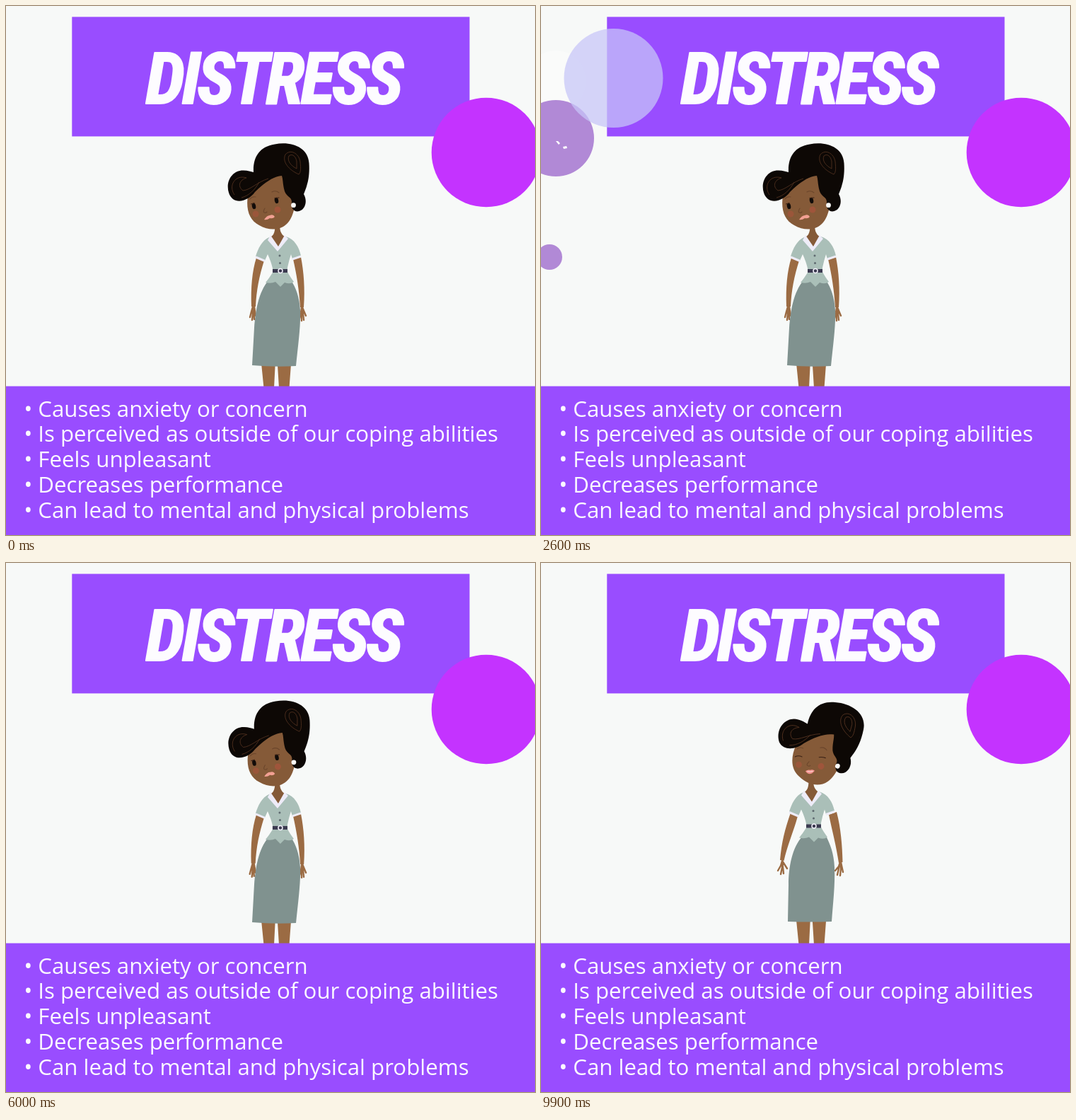
Animation of 748 by 748 pixels, one loop 10 s. Source, as an HTML page:

```html
<!DOCTYPE html>
<html lang="en">
<head>
<meta charset="utf-8">
<title>Distress</title>
<style>
html, body { margin: 0; width: 100%; height: 100%; overflow: hidden; background: #f7f9f8; }
svg { display: block; width: 100%; height: 100%; }
#title {
  font: italic 900 100px "Roboto Condensed", Roboto, sans-serif;
  font-stretch: 75%; letter-spacing: -.045em;
  fill: #fdfcff; stroke: #fdfcff; stroke-width: 2; stroke-linejoin: round;
}
#list { font: 31.2px "Open Sans", sans-serif; fill: #fbf9ff; }
.skin { fill: #9b6b43; }
.face { fill: #855a38; }
.hand { fill: none; stroke: #9b6b43; stroke-width: 2.4; stroke-linecap: round; stroke-linejoin: round; }
.line { fill: none; stroke: #3a2115; stroke-width: 1.1; stroke-linecap: round; }
.strand { fill: none; stroke: #50301f; stroke-width: .9; }
</style>
</head>
<body>
<svg viewBox="0 0 748 748">
  <rect width="748" height="748" fill="#f7f9f8"/>
  <rect x="93.300" y="15.400" width="562.200" height="169" fill="#994dff"/>
  <text id="title" x="377.500" text-anchor="middle">DISTRESS</text>
  <circle cx="679" cy="207" r="77.300" fill="#c433ff"/>

  <path class="skin" d="M360.500 500L364.500 540H379L381 500ZM383.500 500L386 540H400.500L403.500 500Z"/>
  <g id="arms">
    <path id="armL" class="skin"/><path id="armR" class="skin"/>
    <path id="handL" class="hand"/><path id="handR" class="hand"/>
  </g>
  <path id="skirt" fill="#80928f"/>
  <g id="torso">
    <path class="face" d="M380 306L388 306Q385 320 394 326L385 343L373 327Q382 324 380 306Z"/>
    <path fill="#aabfb8" d="M372 327C362 331 356 344 353 354L366 360L370 351Q375 362 377 371V377Q372 385 367 391Q375 393 381 390L388 397L394 391Q402 394 407 390Q401 382 398 376V370Q400 360 403 351L405 358L417 353C414 340 408 330 396 326L385 344Z"/>
    <path fill="#eeecf8" d="M374 324L370 331L384 347L399 329L394 324L385 340Z"/>
    <path fill="none" stroke="#eeecf8" stroke-width="3" d="M353 355L366 360.500M405 358L417 354"/>
    <path fill="#3b3a50" d="M377 372H398V377H377Z"/>
    <circle cx="388" cy="374.500" r="3" fill="#3b3a50" stroke="#f4f2fb" stroke-width="1.500"/>
    <circle cx="387" cy="353" r="1.500" fill="#5f6a70"/>
    <circle cx="387.500" cy="363.500" r="1.500" fill="#5f6a70"/>
  </g>
  <g id="head">
    <path class="face" d="M342 268C339 288 344 303 358 310C372 318 389 318 399 306C404 300 406 293 408 285C411 276 408 268 400 266L392 238C375 242 352 254 342 268Z"/>
    <circle cx="353" cy="294" r="4.500" fill="#b4523e" opacity=".45"/>
    <circle cx="384" cy="288" r="4.500" fill="#b4523e" opacity=".55"/>
    <path class="line" stroke-opacity=".35" d="M345 273Q348 269 353 270M376 263Q381 260 386 264M366 286Q363 291 365 292Q368 293 369 291"/>
    <g id="sad">
      <g fill="#120c09">
        <ellipse cx="350.500" cy="283" rx="2.700" ry="4.200" transform="rotate(-12 350.500 283)"/>
        <ellipse cx="382.500" cy="275" rx="2.700" ry="4.200" transform="rotate(-12 382.500 275)"/>
      </g>
      <path class="line" d="M346.500 280L351 278.500M380 271.500L386 271"/>
      <path fill="#f2a093" d="M365 302Q369 296 373 296Q378 294 380 298Q378 301 373 300Q369 303 365 302Z"/>
    </g>
    <g id="calm">
      <path class="line" d="M345 284.500Q349 281 354.500 282M378 276.500Q382 274.500 387 275"/>
      <g transform="translate(371 299.500) rotate(-15)">
        <path fill="#f2938f" d="M-6.500 -1Q-3 -3.500 0 -2.500Q3.500 -3.500 6.500 -1.500Q3 3 -1 3Q-4.500 2.500 -6.500 -1Z"/>
        <path fill="none" stroke="#fff1ee" stroke-width=".8" d="M-4 -.5Q0 .5 4 -.8"/>
      </g>
    </g>
    <path fill="#0d0805" d="M390 240C378 241 365 250 352 263C343 276 321 283 315 264C310 248 320 232 336 232.500C342 232.500 346 234 350 235C349 214 358 199 380 195.500C404 191 427 200 428.500 222C430 244 425 256 421 266C427 276 423 290 412 290.500C405 290 403 284 404 277C404 270 397 270 394 262C391 252 392 246 390 240Z"/>
    <path class="strand" d="M323 267C314 254 324 238 340 243M333 271C344 268 352 260 358 249M340 243C330 246 327 255 335 261C346 260 355 249 371 244"/>
    <path class="strand" d="M414 238C400 232 390 220 395 210C402 202 414 208 416 220C417 230 417 235 414 238M411 230C403 226 397 219 400 212C405 208 410 213 411 220Z"/>
    <circle cx="406.500" cy="281.700" r="3.400" fill="#fbfaf7"/>
  </g>

  <rect y="537.600" width="748" height="211" fill="#994dff"/>
  <g id="list"></g>
  <g id="bubbles"></g>
  <g id="confetti"></g>
</svg>
<script>
const NS = "http://www.w3.org/2000/svg";
const LOOP = 10000, STEP = 100;
const $ = id => document.getElementById(id);
const clamp = v => Math.max(0, Math.min(1, v));
const ease = v => { v = clamp(v); return v * v * (3 - 2 * v); };
const easeOut = v => 1 - (1 - clamp(v)) ** 3;

function add(parent, tag, attrs) {
  const el = document.createElementNS(NS, tag);
  for (const key in attrs) el.setAttribute(key, attrs[key]);
  return $(parent).appendChild(el);
}

// Blend two paths that share the same commands.
function mix(a, b, k) {
  const to = b.match(/-?[\d.]+/g);
  let i = 0;
  return a.replace(/-?[\d.]+/g, n => (+n + (to[i++] - n) * k).toFixed(2));
}

["Causes anxiety or concern",
 "Is perceived as outside of our coping abilities",
 "Feels unpleasant",
 "Decreases performance",
 "Can lead to mental and physical problems"
].forEach((line, i) => {
  add("list", "text", { x: 25.5, y: 580.5 + 35.8 * i }).textContent = "• " + line;
});

// Choose the largest title size that suits the available face.
const title = $("title");
const size = Math.min(101, 100 * 366 / title.getComputedTextLength());
title.style.fontSize = size + "px";
title.setAttribute("y", 102.5 + .3555 * size);

// Drooping and upright forms of each limb.
const limbs = {
  armL: ["M354 356C348 375 346 398 347 425L353 425C354 402 358 382 365 360Z",
         "M353 353C345 376 340 395 338 420L343.5 421C348 400 357 380 363 358Z"],
  armR: ["M417 355C421 375 423 400 421 426L416 426C414.5 402 411 380 406 358Z",
         "M418 352C424 375 426 400 426.5 423L421 424C417.5 400 412 380 407 356Z"],
  handL: ["M349 425L347 432L345 440M349 425L349 433L348 444M350 425L351 443M351 425L353 438",
          "M341 421L339 428L335 435M341 421L341 430L339 440M341 421L343 439M341 421L348 432"],
  handR: ["M418 426L417 434L415 442M418 426L418 445M419 426L420 434L421 444M419 426L424 438",
          "M423 423L421 429L416 435M423 423L419 441M424 423L424 432L423 442M424 423L427 437"],
  skirt: ["M371 388C357 405 353 430 351 455L348 508Q380 511 410 509C413 480 417 450 416 430C415 412 410 398 403 388Z",
          "M370 386C355 402 350 430 350 455L349 507Q380 508 411 507C413 480 416 455 415 430C414 410 409 398 403 386Z"]
};

function drawWoman(t) {
  const p = t < 150 ? 0 : (t - 150) % 2900;
  const rise = .93 * ease(p / 450) + .07 * ease((p - 450) / 550);
  const up = rise * (1 - ease((p - 1080) / 220));
  const sag = 1.4 * Math.sin(Math.PI * clamp((p - 1150) / 800));
  for (const id in limbs) $(id).setAttribute("d", mix(...limbs[id], up));
  $("arms").setAttribute("transform", `translate(${-1.5 * sag} ${sag})`);
  $("torso").setAttribute("transform", `translate(${-2 * up - 2 * sag} ${-2.5 * up + 1.8 * sag})`);
  $("head").setAttribute("transform",
    `translate(${5 * up - 4 * sag} ${-1.5 * up + 1.5 * sag}) rotate(${15 * up} 384 315)`);
  $("sad").style.display = up > .5 ? "none" : "";
  $("calm").style.display = up > .5 ? "" : "none";
}

const bubbles = [
  { x: 21, y: 106, r: 43, rise: -6, fill: "#fdfefd", opacity: .5 },
  { x: 21, y: 187, r: 54, rise: 18, fill: "#b189d6", opacity: 1 },
  { x: 12, y: 355, r: 18, rise: 5, fill: "#b189d6", opacity: 1 },
  { x: 102.5, y: 102, r: 70, rise: 12, fill: "#c7c6f8", opacity: .73 }
];
for (const b of bubbles) b.el = add("bubbles", "circle", { cx: b.x, fill: b.fill, opacity: b.opacity });

function drawBubbles(t) {
  const left = (2600 - t) / 1100;
  const scale = easeOut((t - 50) / 1000) * (1 - ease((t - 2700) / 600));
  for (const b of bubbles) {
    b.el.setAttribute("cy", b.y + b.rise * left);
    b.el.setAttribute("r", Math.max(0, b.r * scale * (1 - .025 * left)));
  }
}

const bits = [
  { dx: -14, dy: -40, spin: 90, fill: "#fdfc5a", d: "M-14 -8L13 -11L2 14Z" },
  { dx: 36, dy: -98, spin: -120, fill: "#fdfc5a", d: "M-8 2L4 -7L7 7Z" },
  { dx: 130, dy: -169, spin: 80, fill: "#7541c9", d: "M-4 -14L14 -4L4 14L-14 4Z" },
  { dx: 15, dy: -149, spin: 0, fill: "#8a62b4", d: "M-4.5 0a4.500 4.500 0 1 0 9 0a4.500 4.500 0 1 0 -9 0Z" },
  { dx: 171, dy: -61, spin: 0, fill: "#3fb9de", d: "M-8 0a8 8 0 1 0 16 0a8 8 0 1 0 -16 0Z" },
  { dx: -12, dy: -12, spin: 0, fill: "#fff", d: "M-3 -2L0 -2L3 1L1 3Z", small: true },
  { dx: 18, dy: 9, spin: 0, fill: "#fff", d: "M-3 -1L2 -2L3 1L-2 2Z", small: true }
];
for (const b of bits) b.el = add("confetti", "path", { d: b.d, fill: b.fill });

function drawConfetti(t) {
  const s = (t - 2500) / 1000;
  const go = (1 - Math.exp(-4 * s)) / (1 - Math.exp(-4));
  const fall = 70 * Math.max(0, s - 1) ** 2;
  $("confetti").style.display = s > 0 && s < 2.6 ? "" : "none";
  $("confetti").setAttribute("opacity", 1 - clamp((s - 1.9) / .7));
  for (const b of bits) {
    const scale = b.small ? 1 - clamp((s - .5) * 3) : clamp((s - .1) * 4);
    b.el.setAttribute("transform",
      `translate(${28 + b.dx * go} ${197 + b.dy * go + fall}) rotate(${b.spin * (s - 1)}) scale(${scale})`);
  }
}

function draw(now) {
  const t = Math.floor((now % LOOP) / STEP) * STEP;
  drawWoman(t);
  drawBubbles(t);
  drawConfetti(t);
}

const start = performance.now();
function tick() {
  draw(performance.now() - start);
  requestAnimationFrame(tick);
}
tick();
</script>
</body>
</html>
```
